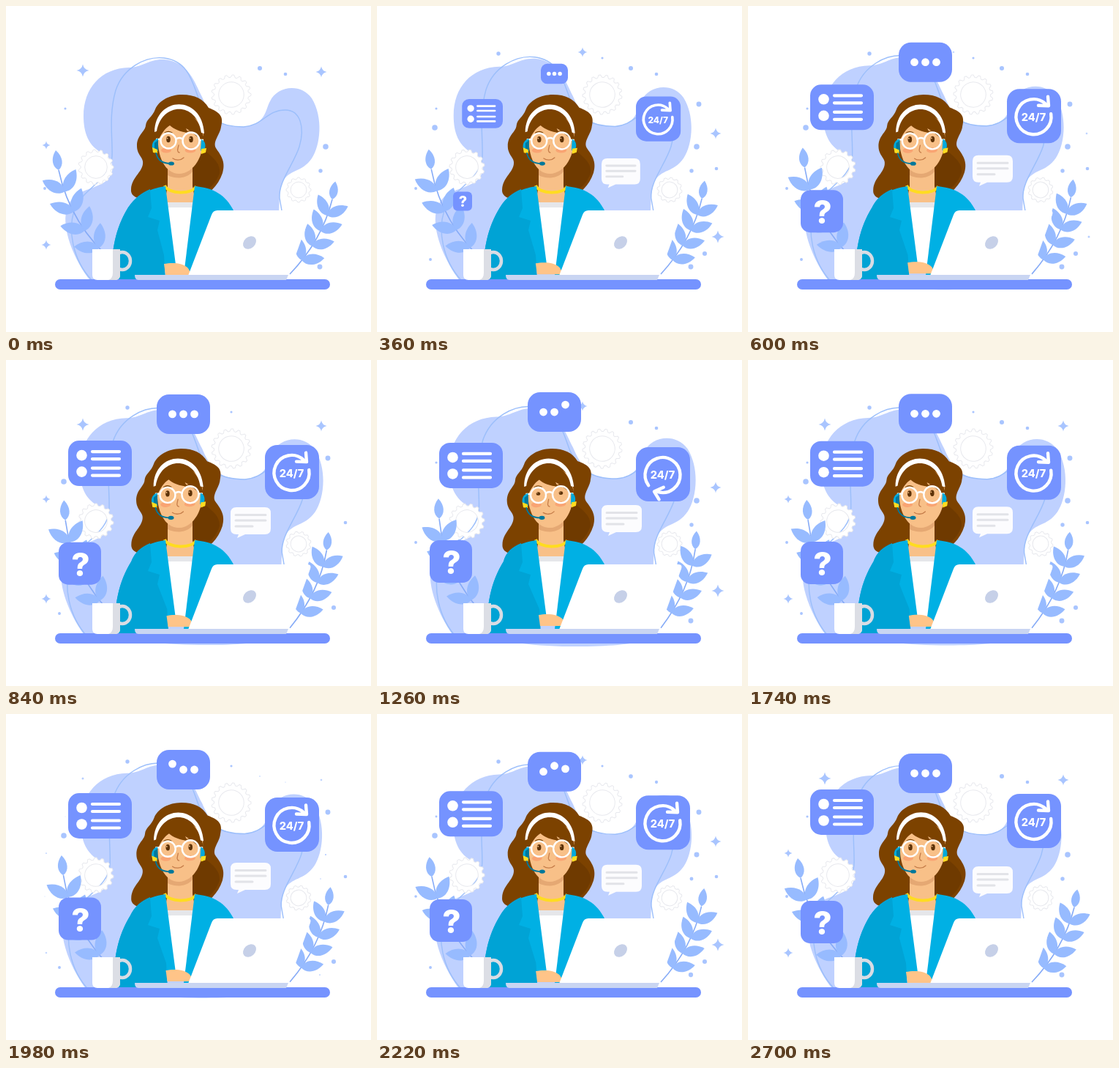
An HTML page that plays this animation: 499 by 445 pixels, repeating every 2.76 s.

```html
<!DOCTYPE html>
<html lang="en">
<head>
<meta charset="utf-8">
<title>Support desk</title>
<style>
html, body { margin: 0; width: 100%; height: 100%; overflow: hidden; background: #fff; }
svg { display: block; width: 499px; height: 445px; }
text { font-family: Inter, "Open Sans", sans-serif; font-weight: 800; fill: #fff; text-anchor: middle; }
</style>
</head>
<body>
<svg viewBox="0 0 499 445" xmlns="http://www.w3.org/2000/svg">
  <g id="sky" fill="#a9c5ff"></g>
  <g id="cloud">
    <path fill="#bfd1ff" d="M116 376C95 350 72 300 85 272C95 252 110 253 130 243C150 234 150 210 134 202C112 192 106 172 106 150C106 112 130 85 168 84C186 84 196 72 216 73C250 76 258 105 268 124C278 148 290 165 322 165C356 163 354 142 361 130C370 110 402 104 418 126C434 152 430 190 418 208C404 228 388 222 378 240C368 265 380 330 360 376C340 385 250 387 200 380Z"/>
    <path fill="none" stroke="#9cbffb" stroke-width="1.4" d="M117 374C90 345 85 305 93 280C102 250 144 238 145 205C146 180 140 150 150 115C160 85 190 68 216 71C250 75 255 105 264 128C274 152 290 165 325 165C352 163 356 142 382 142C402 142 409 165 401 192C394 215 372 240 374 262L378 285"/>
  </g>
  <g id="gears" fill="#fff" stroke="#e8e9ee" fill-rule="evenodd"></g>
  <g id="plants" fill="#97bbff"></g>

  <g id="hair">
    <path fill="#7c4200" d="M241 121C224 121 209 129 204 141C200 152 192 154 191 163C190 172 179 176 179 191C179 204 189 207 187 216C185 228 172 234 171 250C170 260 180 264 195 264H262C276 258 290 246 296 228C301 212 293 203 287 194C282 185 293 175 294 165C298 150 292 145 277 139C270 127 258 121 241 121Z"/>
    <path fill="#6f3a00" d="M266 192C277 203 294 212 292 228C286 246 272 255 256 258L250 232Z"/>
  </g>

  <path fill="#f8c088" d="M221 212H255V246L260 272H216L221 246Z"/>
  <path fill="#e5a873" d="M221 218C230 233 246 233 255 214V226C246 237 230 236 221 231Z"/>
  <path fill="#fff" d="M216 268H260L247 357H231Z"/>
  <path fill="#e5e6ea" d="M217 268H259L258 275H218Z"/>
  <path fill="none" stroke="#ffdc20" stroke-width="4" d="M217 245C221 257 255 258 260 246"/>
  <path id="coat" fill="#00b0e4"/>
  <path id="sleeve" fill="#00a3d5"/>
  <path fill="#00b0e4" d="M258 246C284 248 300 258 311 279L290 367H243Z"/>
  <path id="hand" fill="#ffc488" d="M216 352C226 350 242 350 249 358L254 367H218Z"/>

  <g id="face">
    <path fill="#f8c088" d="M208 176C206 205 217 229 237 229C257 228 271 205 270 176C268 138 212 138 208 176Z"/>
    <path fill="#7c4200" d="M203 183C206 129 266 126 272 190C265 181 256 173 246 167L249 173C239 172 229 168 224 163C217 167 212 175 208 184Z"/>
    <path fill="#fff" d="M203 172C204 123 268 120 271 174L267 173C261 130 213 131 206 171Z"/>
    <g fill="#f9a473"><ellipse cx="219" cy="197" rx="7" ry="3.5"/><ellipse cx="252" cy="197" rx="7.5" ry="3.5"/></g>
    <g fill="none" stroke="#c57d4a" stroke-width="1.3" stroke-linecap="round">
      <path d="M236 190C235 195 233 199 237 200M228 208C232 211 239 211 243 207"/>
      <path stroke="#7c4200" d="M217 173C220 171 224 171 227 173M246 172C250 170 255 171 258 174"/>
    </g>
    <g id="eyes"></g>
    <g fill="none" stroke="#fff" stroke-width="2.4">
      <circle cx="222" cy="184" r="10.5"/><circle cx="253" cy="184" r="11.5"/>
      <path d="M232 182Q237 178 242 182M205 182L212 182M264 183L270 183"/>
    </g>
    <path fill="#00a9dc" d="M208 181C200 182 197 193 203 199L208 198ZM267 182C274 184 274 195 269 199L266 197Z"/>
    <path fill="#00789b" d="M208 183L203 187V196L208 198Z"/>
    <path fill="#ffdc20" d="M200 193L207 196V201L201 200ZM267 195L274 194L273 200L267 202Z"/>
    <path fill="none" stroke="#00789b" stroke-width="1.8" d="M205 200C207 212 215 215 225 215"/>
    <ellipse cx="226" cy="215" rx="4" ry="2.6" fill="#00789b"/>
  </g>

  <path fill="#fff" d="M289 279H412Q418 279 416 285L386 368H249L281 285Q283 279 289 279Z"/>
  <ellipse cx="333" cy="323" rx="10" ry="7.6" transform="rotate(-42 333 323)" fill="#c6d0e8"/>
  <rect x="67" y="373" width="376" height="14" rx="7" fill="#7593ff"/>
  <path fill="#c9d5f2" d="M176 367H386L383 374H181Q176 374 176 367Z"/>
  <ellipse cx="159" cy="348" rx="11" ry="12" fill="none" stroke="#d9dce4" stroke-width="4.5"/>
  <path fill="#fff" d="M118 332H156V367Q156 374 149 374H125Q118 374 118 367Z"/>
  <path fill="#dcdee5" d="M146 332H156V367Q156 374 149 374H140Q146 372 146 364Z"/>

  <g id="chat">
    <path fill="#fcfcfe" d="M315 0H354Q362 0 362 8V29Q362 37 354 37H327L316 42L318 37H315Q307 37 307 29V8Q307 0 315 0Z"/>
    <path stroke="#e2e3e8" stroke-width="3" stroke-linecap="round" d="M314 10.5H355M314 18H355M314 26H337"/>
  </g>
  <g id="clock">
    <rect x="354" width="74" height="74" rx="17" fill="#7593ff"/>
    <g id="arrow" fill="none" stroke="#fff" stroke-width="4.4" stroke-linecap="round" stroke-linejoin="round">
      <path d="M414.2 34A24 24 0 1 1 406.5 20M410 10.5L411 23L397 22.5"/>
    </g>
    <text x="390.5" y="43.5" font-size="14.5">24/7</text>
  </g>
  <g id="list">
    <rect x="85" width="87" height="62" rx="15" fill="#7593ff"/>
    <g fill="#fff"><circle cx="103.5" cy="20" r="7.3"/><circle cx="103.5" cy="42.5" r="7.3"/></g>
    <path stroke="#fff" stroke-width="4.2" stroke-linecap="round" d="M118 15H155M118 25H155M118 37.5H155M118 47.5H155"/>
  </g>
  <g id="typing">
    <rect x="206" width="73" height="54" rx="17" fill="#7593ff"/>
    <g id="dots" fill="#fff"></g>
  </g>
  <g id="ask">
    <rect x="72" width="58" height="58" rx="13" fill="#7593ff"/>
    <text x="102" y="46" font-size="44">?</text>
  </g>
</svg>
<script>
const LOOP = 2760, STEP = 60, SWAY = 2640, TAU = 2 * Math.PI;
const $ = id => document.getElementById(id);
const clamp = v => Math.max(0, Math.min(1, v));
const smooth = v => (v = clamp(v), v * v * (3 - 2 * v));
const wrap = (v, n) => ((v % n) + n) % n;
const move = (el, value) => el.setAttribute("transform", value);
const scaleAt = (x, y, s) => `translate(${x} ${y}) scale(${s}) translate(${-x} ${-y})`;

function add(parent, tag, attrs) {
  const el = document.createElementNS("http://www.w3.org/2000/svg", tag);
  for (const key in attrs) el.setAttribute(key, attrs[key]);
  return parent.appendChild(el);
}

// Each group runs from its largest member to its smallest.
function star([x, y], i) {
  const r = 8.5 - i, q = r * 0.16;
  const d = `M0 ${-r}Q${q} ${-q} ${r} 0Q${q} ${q} 0 ${r}Q${-q} ${q} ${-r} 0Q${-q} ${-q} 0 ${-r}Z`;
  return { x, y, el: add($("sky"), "path", { d }) };
}
const spot = ([x, y], i) => ({ x, y, el: add($("sky"), "circle", { r: 3.8 - i * 0.37 }) });
const starsA = [[105, 88], [431, 90], [55, 326], [55, 190]].map(star);
const starsB = [[466, 315], [463, 174], [281, 63]].map(star);
const spotsA = [[437, 192], [429, 356], [347, 85], [430, 225], [382, 93], [53, 249], [81, 140]].map(spot);
const spotsB = [[79, 166], [440, 134], [448, 338], [166, 65], [464, 222], [73, 346], [308, 71]].map(spot);
const grow = (items, s) => items.forEach(p => move(p.el, `translate(${p.x} ${p.y}) scale(${s})`));

function gear(x, y, r) {
  const teeth = Math.round(r / 2 + 3), h = r * 0.64;
  let d = "";
  for (let i = 0; i < teeth * 4; i++) {
    const a = (i - 0.5) / teeth * TAU / 4;
    const q = i % 4 < 2 ? r : r * 0.87;
    d += (i ? "L" : "M") + (q * Math.cos(a)).toFixed(2) + " " + (q * Math.sin(a)).toFixed(2);
  }
  d += `ZM${h} 0A${h} ${h} 0 1 0 ${-h} 0A${h} ${h} 0 1 0 ${h} 0Z`;
  return { x, y, el: add($("gears"), "path", { d }) };
}
const gears = [gear(308, 121, 27), gear(123, 220, 24), gear(400, 251, 17)];

// Leaf pairs along a curved stem that runs from tip a to root b.
function plant(a, c, b, size) {
  const g = add($("plants"), "g", {});
  add(g, "path", { d: `M${a}Q${c} ${b}`, fill: "none", stroke: "#86abf7", "stroke-width": 1.6 });
  const leaf = (x, y, turn, l) => {
    const w = l * 0.31;
    add(g, "path", {
      d: `M0 0C${w} ${-l * 0.2} ${w} ${-l * 0.65} 0 ${-l}C${-w} ${-l * 0.65} ${-w} ${-l * 0.2} 0 0Z`,
      transform: `translate(${x} ${y}) rotate(${turn})`
    });
  };
  for (let i = 0; i < 5; i++) {
    const u = i * 0.2, v = 1 - u;
    const [x, y] = [0, 1].map(n => v * v * a[n] + 2 * u * v * c[n] + u * u * b[n]);
    const [tx, ty] = [0, 1].map(n => v * (c[n] - a[n]) + u * (b[n] - c[n]));
    const lean = Math.atan2(-tx, ty) * 360 / TAU;
    if (!i) leaf(x, y, lean * 0.7, size * 0.8);
    else for (const side of [-44, 46]) leaf(x, y, lean + side, size);
  }
  return g;
}
const left = plant([72, 224], [88, 300], [150, 352], 34);
const right = plant([446, 264], [432, 320], [388, 366], 31);

const eyes = [222, 253].map(x => {
  const g = add($("eyes"), "g", {});
  add(g, "ellipse", { rx: 2.8, ry: 4.2, fill: "#5d3208" });
  add(g, "circle", { cx: -1.4, cy: -1.4, r: 0.9, fill: "#f8c088" });
  return { x, g };
});
const dots = [227.5, 242.5, 257.5].map(cx => add($("dots"), "circle", { cx, r: 5.4 }));

const cards = [
  { id: "chat", top: 208, drift: -10, px: 307, py: 42, start: 8 },
  { id: "clock", top: 109, drift: 10, px: 354, py: 74, start: 66 },
  { id: "list", top: 103, drift: 10, px: 172, py: 62, start: 122 },
  { id: "typing", top: 54, drift: -10, px: 242.5, py: 54, start: 158 },
  { id: "ask", top: 255, drift: -9, px: 130, py: 0, start: 174 }
];

function hop(t, i) {
  const u = wrap(t - 860 - i * 140, 1050) / 240;
  return t > 860 && u < 1 ? 10 * Math.sin(Math.PI * u) : 0;
}

// Shrinks to nothing around the given time, every half loop or so.
function blink(t, mid) {
  const gap = Math.abs(wrap(t - mid + 660, 1320) - 660);
  return clamp((gap - 85) / 60);
}

function draw(t) {
  const k = (1 - Math.cos(TAU * Math.min(t, SWAY) / SWAY)) / 2;

  move($("cloud"), scaleAt(270, 230, 1 + 0.045 * k));
  const beat = Math.cos(TAU * (t + 60) / 920);
  grow(starsA, smooth(beat * 1.6));
  grow(starsB, smooth(-beat * 1.6));
  grow(spotsA, blink(t, 760));
  grow(spotsB, blink(t, 0));

  gears.forEach((g, i) => move(g.el, `translate(${g.x} ${g.y}) rotate(${(i % 2 ? -60 : 60) * t / LOOP})`));
  move(left, `rotate(${6 * k} 150 345)`);
  move(right, `rotate(${-6 * k} 385 365)`);

  for (const id of ["hair", "face"]) move($(id), `rotate(${-1.7 * k} 240 235)`);
  const d = 6 * k;
  const arm = `${167 + d} 275C${150 + d} 302 ${143 + d} 336 ${145 + d} 373`;
  $("coat").setAttribute("d", `M218 246C194 249 177 260 ${arm}H${217 + d}V353H232Z`);
  $("sleeve").setAttribute("d", `M197 250C185 255 176 262 ${arm}H${218 + d}L${216 + d} 340L207 306L210 293L194 288L199 276Z`);
  move($("hand"), `translate(${5 * k} ${-4 * k})`);
  const lid = 1 - 0.9 * smooth(1 - Math.abs(t - 1320) / 120);
  eyes.forEach(e => move(e.g, `translate(${e.x} 182) scale(1 ${lid})`));

  for (const c of cards) {
    const s = smooth((t - c.start) / 400);
    move($(c.id), `translate(0 ${c.top + c.drift * k}) ${scaleAt(c.px, c.py, s)}`);
  }
  move($("arrow"), `rotate(${360 * smooth((t - 900) / 800)} 390.5 38)`);
  dots.forEach((dot, i) => dot.setAttribute("cy", 27 - hop(t, i)));
}

const begin = performance.now();
function tick() {
  const t = wrap(performance.now() - begin, LOOP);
  draw(Math.floor(t / STEP) * STEP);
  requestAnimationFrame(tick);
}
tick();
</script>
</body>
</html>
```
